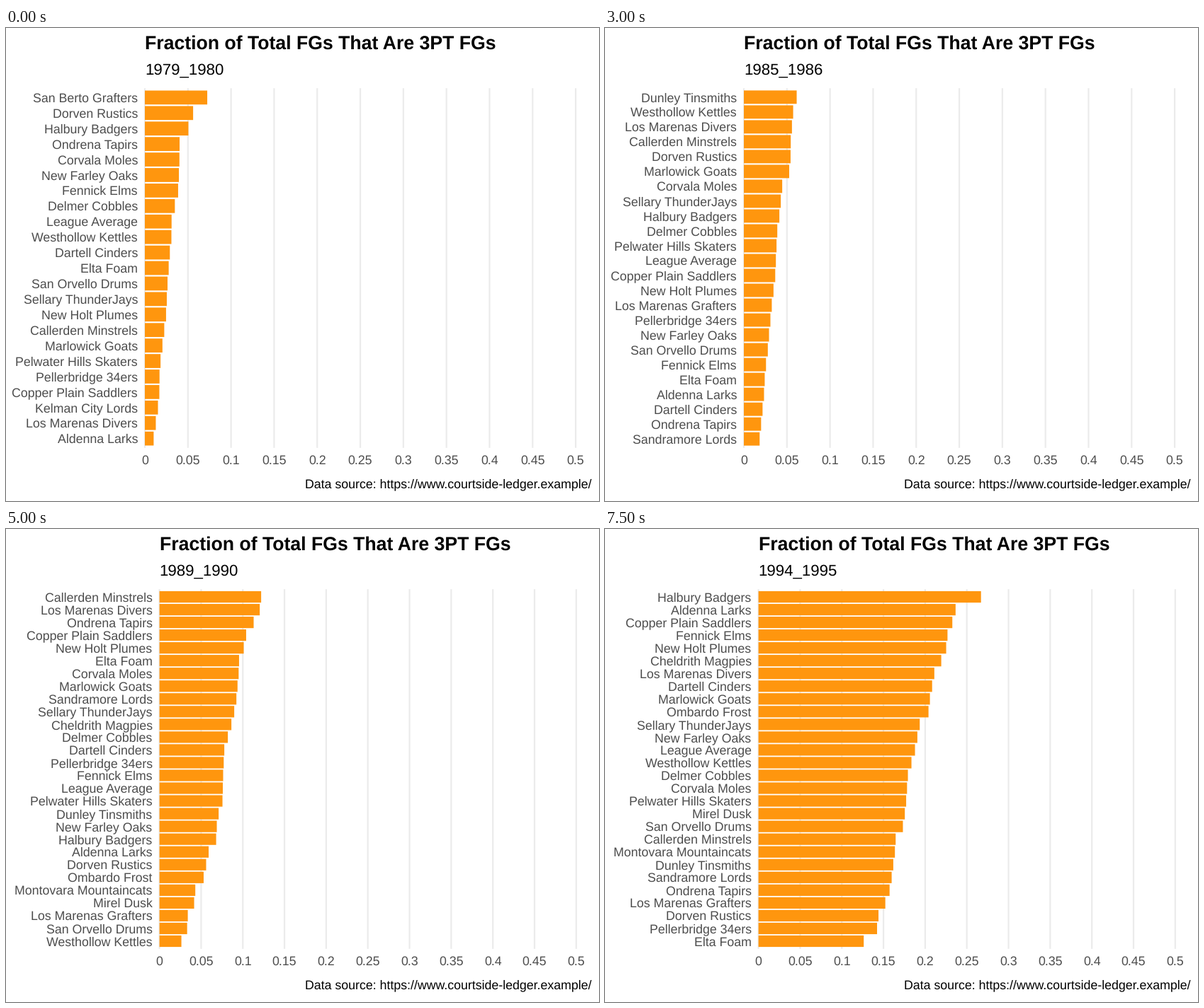
Recreate the animation shown at these times as a matplotlib script. Size 837 px wide and 669 px high, loop 8 s.

```python
import matplotlib.pyplot as plt
import numpy as np
from matplotlib.animation import FuncAnimation

W, H, DPI = 837, 669, 100
TOP, BOTTOM, RIGHT = 85.2, 593.8, 826
X_MAX = 0.518
FIRST_YEAR, SEASONS = 1979, 16
ORANGE, GRID, AXIS_TEXT = "#FF960E", "#EBEBEB", "#4D4D4D"

plt.rcParams["font.family"] = "Liberation Sans"
plt.rcParams["text.hinting"] = "none"

TEAMS = dict(
    av="League Average", al="Aldenna Larks", ca="Callerden Minstrels",
    ch="Cheldrith Magpies", co="Corvala Moles", cp="Copper Plain Saddlers",
    dc="Delmer Cobbles", di="Dartell Cinders", dr="Dorven Rustics",
    dt="Dunley Tinsmiths", ef="Elta Foam", fe="Fennick Elms",
    hb="Halbury Badgers", kc="Kelman City Lords", ld="Los Marenas Divers",
    lg="Los Marenas Grafters", mg="Marlowick Goats", mi="Mirel Dusk",
    mm="Montovara Mountaincats", no="New Farley Oaks", np="New Holt Plumes",
    of="Ombardo Frost", ot="Ondrena Tapirs", pb="Pellerbridge 34ers",
    ph="Pelwater Hills Skaters", sg="San Berto Grafters",
    sl="Sandramore Lords", so="San Orvello Drums",
    st="Sellary ThunderJays", wk="Westhollow Kettles",
)
MOVED = dict(lg="sg", sl="kc", kc="sl", sg="lg")

# Season rankings, best first
RANKS = {
    1979: "sg dr hb ot co no fe dc av wk di ef so st np ca mg ph pb cp kc ld al",
    1983: "ef wk fe so mg dc dr ld no cp ot av kc dt np ca hb st ph sg di co al pb",
    1985: "dt wk ld ca dr mg co st hb dc ph av cp np lg pb no so fe ef al di ot sl",
    1987: "dr st np dt dc pb ot ld no sl mg av ef so ph ca fe lg cp al hb co di wk",
    1989: "ca ld ot cp np ef co mg sl st ch dc di pb fe av ph dt no hb al dr of mm "
          "mi lg so wk",
    1991: "mg hb ot ph dt mi cp pb ca sl st al no np av of fe di wk lg ef ld co dc "
          "so mm dr ch",
    1994: "hb al cp fe np ch ld di mg of st no av wk dc co ph mi so ca mm dt sl ot "
          "lg dr pb ef",
}

# Shares in thousandths along each ranking; skipped ranks are interpolated
SKIPPED = (7, 11, 13, 15, 21)
SHARES = {
    1979: [72.4, 56, 50.5, 40.3, 40.1, 39.5, 38.6, 31, 30.8, 29, 26.3, 24.6,
           20.4, 18.2, 17, 16.8, 15.2, 10.2],
    1983: [43.8, 40.2, 39.5, 33.8, 33, 32.3, 31.5, 31.2, 30.6, 28.5, 26.3,
           24.3, 20.7, 19.8, 18.3, 17.8, 17.4, 15.6, 15.2],
    1985: [61.3, 57.2, 55.8, 54.4, 54.2, 52.6, 44.5, 41.2, 38.8, 37.9, 36.4,
           32.4, 29.2, 27.8, 25.7, 24.2, 23.4, 20, 18.3],
    1987: [102.2, 86, 78.2, 73, 70.8, 68.8, 68, 65.9, 61.3, 57.6, 56.9, 50.7,
           49.5, 44.5, 42.5, 39.5, 38.7, 29.2, 19.9],
    1989: [122, 120.3, 113, 104, 101.1, 95.5, 95, 92.3, 89.7, 86.3, 77.8, 76.4,
           75.6, 71, 68.8, 68, 59, 53, 43, 41.6, 34, 33.2, 26.3],
    1991: [140, 139.1, 133, 128, 112.3, 106.7, 102.4, 100.4, 93.5, 91, 89, 87.5,
           83, 77.3, 73, 71, 67, 63.3, 56.7, 56.5, 53.5, 50.6, 48.9],
    1994: [267, 236.5, 232.6, 226.8, 225.2, 219.3, 211, 205.7, 204, 193.5, 187.8,
           179.3, 177.2, 175.6, 173.3, 164.6, 163.7, 159.8, 157.3, 152.2, 144,
           142.3, 126.3],
}

# Other seasons: league average, leading team and its share
BLENDED = {
    1980: (23, "sg", 59), 1981: (26, "sg", 47), 1982: (25, "so", 42),
    1984: (35, "dt", 63.5), 1986: (53, "dt", 88), 1988: (73, "np", 151),
    1990: (82, "hb", 136.5), 1992: (107, "hb", 159), 1993: (117, "hb", 191),
}
NOT_YET = {1984: {"sl": "kc"}, 1988: {"mm": None, "of": None}}


def known_season(year):
    teams = RANKS[year].split()
    knots = [i for i in range(len(teams)) if i not in SKIPPED]
    shares = np.interp(range(len(teams)), knots, SHARES[year])
    return dict(zip(teams, shares / 1000))


def relative(season, team):
    share = season.get(team, season.get(MOVED.get(team)))
    return None if share is None else share / season["av"]


def blended_season(year):
    before = max(y for y in RANKS if y < year)
    after = min(y for y in RANKS if y > year)
    a, b = known_season(before), known_season(after)
    t = (year - before) / (after - before)
    average, leader, top = BLENDED[year]
    swap = NOT_YET.get(year, {})
    season = {}
    for team in b:
        team = swap.get(team, team)
        if team is None:
            continue
        ra, rb = relative(a, team), relative(b, team)
        ratio = rb if ra is None else (1 - t) * ra + t * rb
        season[team] = min(ratio * average, 0.93 * top) / 1000
    season[leader] = top / 1000
    return season


def ranking(year):
    season = known_season(year) if year in RANKS else blended_season(year)
    return sorted(season.items(), key=lambda item: -item[1])


# The small surplus keeps the pixel size from being rounded down
fig = plt.figure(figsize=((W + 0.01) / DPI, (H + 0.01) / DPI), dpi=DPI,
                 facecolor="white")
ax = fig.add_axes([0, 0, 1, 1])


def label(x, y, text, size=12.8, **style):
    ax.text(x, y, text, fontsize=size, va="baseline", **style)


def draw(i):
    year = FIRST_YEAR + i
    rows = ranking(year)
    left = 216.6 if year >= 1989 else 196
    unit = (RIGHT - left) / X_MAX
    step = (BOTTOM - TOP) / (len(rows) + 0.2)
    ys = TOP + step * (0.6 + np.arange(len(rows)))

    ax.cla()
    ax.axis("off")
    ticks = np.arange(11) * 0.05
    ax.vlines(left + ticks * unit, TOP, BOTTOM, color=GRID, lw=1.55,
              zorder=0, snap=False)
    ax.barh(ys, [share * unit for _, share in rows], left=left,
            height=0.9 * step, color=ORANGE, lw=0, snap=False)

    for y, (team, _) in zip(ys, rows):
        label(left - 10, y + 6.4, TEAMS[team], color=AXIS_TEXT, ha="right")
    for v in ticks:
        label(left + v * unit, 617, f"{v:.2g}", color=AXIS_TEXT, ha="center")

    label(left, 30, "Fraction of Total FGs That Are 3PT FGs", 19.2,
          weight="bold", color="black")
    label(left, 66, f"{year}_{year + 1}", 16, color="black")
    label(827, 650, "Data source: https://www.courtside-ledger.example/",
          color="black", ha="right")
    ax.set_xlim(0, W)
    ax.set_ylim(H, 0)


anim = FuncAnimation(fig, draw, frames=SEASONS, interval=500, repeat=True,
                     repeat_delay=0)
plt.show()
```
